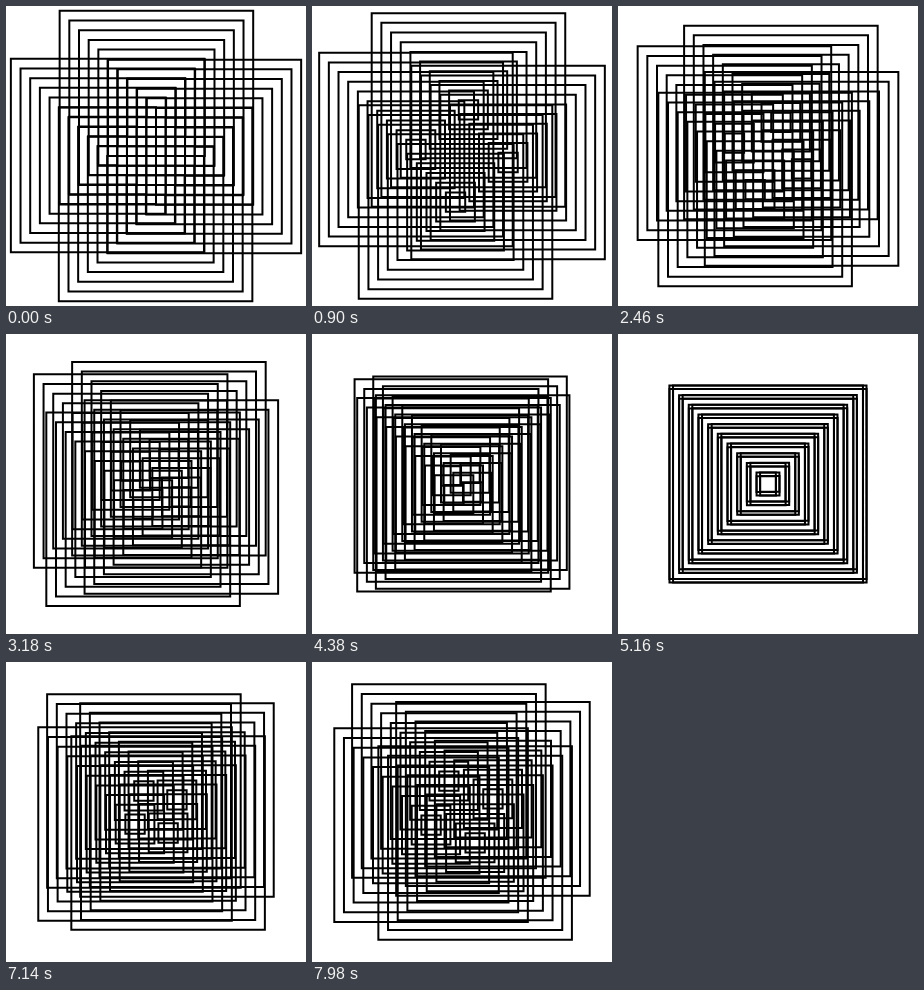
An HTML page that plays this animation: 300x300 px, repeating every 8 s.

```html
<!DOCTYPE html>
<html lang="en">
<head>
<meta charset="utf-8">
<title>Nested squares</title>
<style>
  html, body { margin: 0; width: 100%; height: 100%; overflow: hidden; background: #fff; }
  svg { display: block; width: 100%; height: 100%; }
</style>
</head>
<body>
<svg viewBox="-150 -150 300 300">
  <path id="nest" fill="none" stroke="#000" stroke-width="2"/>
</svg>
<script>
const UNIT = 300 / 31;
const SQUARES = 10;
const REACH = 5 * UNIT;
const LOOP = 8000;
const STEP = 60;

const path = document.getElementById('nest');
const svg = path.parentNode;

let outline = '';
for (let i = 1; i <= SQUARES; i++) {
  const half = i * UNIT, side = 2 * half;
  outline += `M${-half},${-half}h${side}v${side}h${-side}z`;
}
path.setAttribute('d', outline);

const nests = [path];
while (nests.length < 4) nests.push(svg.appendChild(path.cloneNode()));

// Each nest follows a four-petalled rose, a quarter turn apart, half a degree per step.
function draw(time) {
  const step = Math.floor((time % LOOP) / STEP);
  const angle = (step + 1) * Math.PI / 360;
  const radius = REACH * Math.cos(2 * angle);
  nests.forEach((nest, i) => {
    const a = angle + i * Math.PI / 2;
    nest.setAttribute('transform', `translate(${radius * Math.sin(a)} ${-radius * Math.cos(a)})`);
  });
}

let start;
function frame(now) {
  start ??= now;
  draw(now - start);
  requestAnimationFrame(frame);
}
draw(0);
requestAnimationFrame(frame);
</script>
</body>
</html>
```
